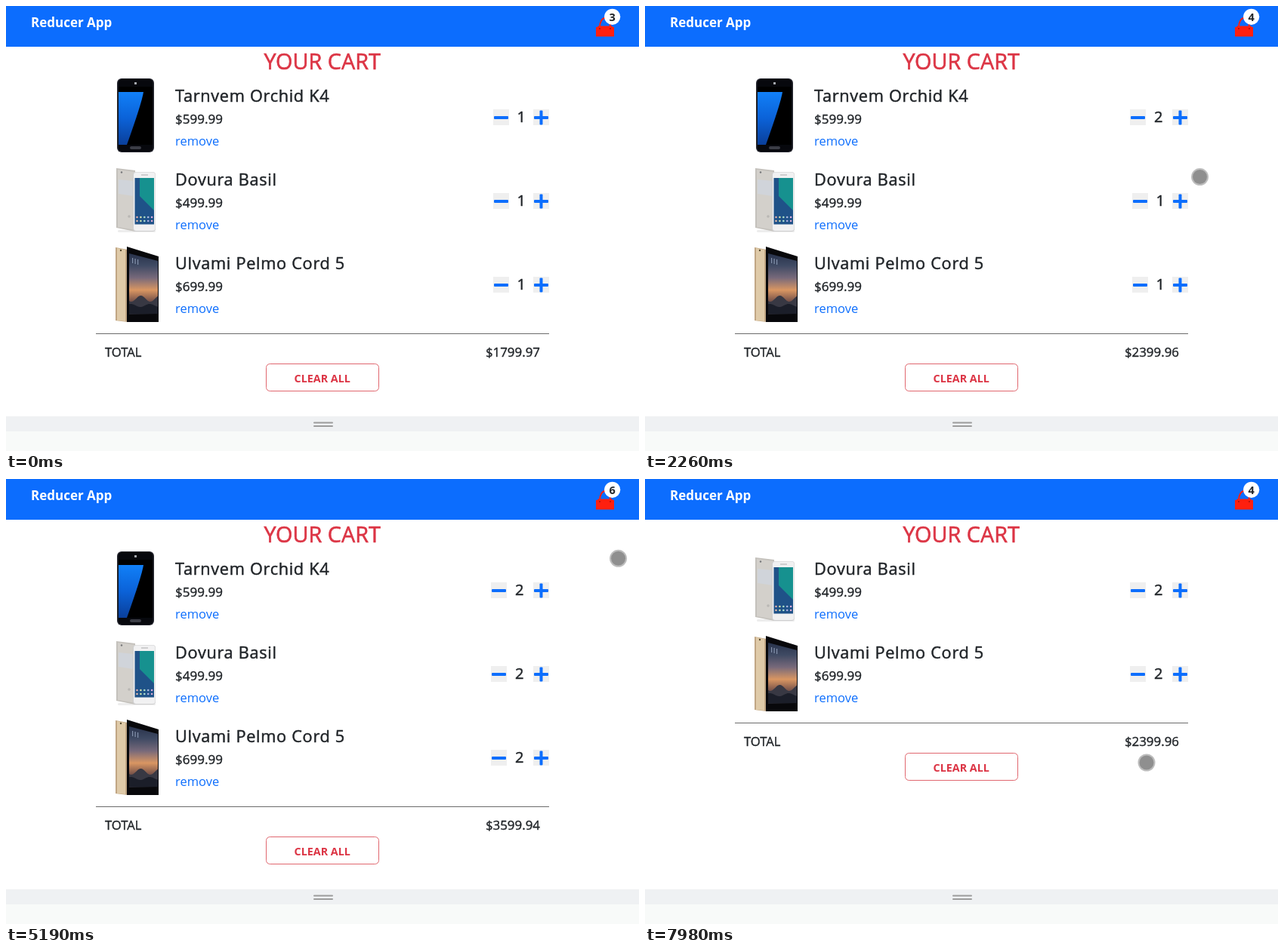
Write an HTML page with a canvas that moves like this. It is 838 px wide and 590 px high and loops after 8000 ms.

```html
<!DOCTYPE html>
<html lang="en">
<head>
<meta charset="utf-8">
<title>Cart</title>
<style>
  html, body { margin: 0; width: 100%; height: 100%; overflow: hidden; background: #fff; }
  canvas { display: block; width: 838px; height: 590px; }
</style>
</head>
<body>
<canvas id="stage"></canvas>
<script>
const W = 838, H = 590, LOOP = 8000, ROW = 111, STEP = 70;
const BLUE = '#0d6efd', RED = '#dc3545', INK = '#212529';
const canvas = document.getElementById('stage');
const ctx = canvas.getContext('2d');
const dpr = window.devicePixelRatio || 1;
canvas.width = W * dpr;
canvas.height = H * dpr;

const items = [
  { name: 'Tarnvem Orchid K4', price: 599.99, art: darkPhone },
  { name: 'Dovura Basil', price: 499.99, art: silverPhone },
  { name: 'Ulvami Pelmo Cord 5', price: 699.99, art: goldPhone }
];

// The cart changes shortly after a press, while the pointer is still lit
const ACT = 130, HOLD = 230;
const clicks = [
  { at: 1430, item: 0, add: 1 },
  { at: 2730, item: 1, add: 1 },
  { at: 4190, item: 2, add: 1 },
  { at: 6390, item: 0, add: -1 },
  { at: 7050, item: 0, add: -1 }
];

// Each move eases to (x, y); bend pushes the middle of its path to the right
const START = { x: 789, y: 566 };
const moves = [
  { from: 260, to: 1040, x: 709, y: 156 },
  { from: 1980, to: 2400, x: 725, y: 244, bend: 20 },
  { from: 2600, to: 2730, x: 710, y: 276 },
  { from: 3360, to: 4120, x: 713, y: 366 },
  { from: 4190, to: 4190, x: 713, y: 372 },
  { from: 4720, to: 5470, x: 826, y: 12, bend: 18 },
  { from: 5540, to: 5540, x: 788, y: 30 },
  { from: 5960, to: 6320, x: 656, y: 135 },
  { from: 6390, to: 6390, x: 647, y: 147 },
  { from: 7580, to: 7980, x: 664, y: 376, bend: 33 }
];

const mix = (a, b, u) => a + (b - a) * u;
const ease = u => u * u * (3 - 2 * u);

function pointerAt(t) {
  let { x, y } = START;
  for (const m of moves) {
    if (t < m.from) break;
    const gaps = Math.round((m.to - m.from) / STEP);
    const gap = (m.to - m.from) / gaps || STEP;
    const n = Math.floor((t - m.from + 8) / gap) + 1;
    const u = ease(Math.min(1, n / (gaps + 1)));
    x = mix(x, m.x, u) + (m.bend || 0) * 4 * u * (1 - u);
    y = mix(y, m.y, u);
  }
  return [x, y];
}

// A thin outline of width `heavy` gives a medium weight
function text(str, x, y, size, { color = INK, weight = 400, align = 'left', spacing = 0, heavy = 0 } = {}) {
  ctx.font = `${weight} ${size}px "Open Sans", "Noto Sans", sans-serif`;
  ctx.letterSpacing = spacing + 'px';
  ctx.textAlign = align;
  ctx.fillStyle = ctx.strokeStyle = color;
  ctx.fillText(str, x, y);
  if (!heavy) return;
  ctx.lineWidth = heavy;
  ctx.lineJoin = 'round';
  ctx.strokeText(str, x, y);
}

function box(x, y, w, h, color, r = 0) {
  ctx.fillStyle = color;
  ctx.beginPath();
  ctx.roundRect(x, y, w, h, r);
  ctx.fill();
}

function disc(x, y, r, color) {
  ctx.fillStyle = color;
  ctx.beginPath();
  ctx.arc(x, y, r, 0, Math.PI * 2);
  ctx.fill();
}

// Upright panel whose top and bottom edges drop by `top` and `bottom` to the right
function panel(x, y, w, h, color, top = 0, bottom = 0) {
  ctx.fillStyle = color;
  ctx.beginPath();
  ctx.moveTo(x, y);
  ctx.lineTo(x + w, y + top);
  ctx.lineTo(x + w, y + h + bottom);
  ctx.lineTo(x, y + h);
  ctx.fill();
}

function fade(y0, y1, ...colors) {
  const g = ctx.createLinearGradient(0, y0, 0, y1);
  colors.forEach((c, i) => g.addColorStop(i / (colors.length - 1), c));
  return g;
}

// Wavy ridge filled down to `base`
function ridge(x, w, y, base, height, phase, color) {
  ctx.fillStyle = color;
  ctx.beginPath();
  ctx.moveTo(x, base);
  for (let i = 0; i <= w; i++) ctx.lineTo(x + i, y - height * Math.sin(i / 4 + phase));
  ctx.lineTo(x + w, base);
  ctx.fill();
}

function darkPhone() {
  box(147, 96, 49, 98, '#25262f', 6);
  box(148.5, 97, 46, 96, '#07080d', 5);
  box(149, 107, 45, 77, '#000');
  ctx.fillStyle = fade(114, 184, '#1180f8', '#0b62d8', '#0a3f9a');
  ctx.beginPath();
  ctx.moveTo(149, 114);
  ctx.lineTo(182, 114);
  ctx.quadraticCurveTo(180, 128, 160, 184);
  ctx.lineTo(149, 184);
  ctx.fill();
  box(170, 101, 3, 3, '#a4a7ad');
  box(164, 186, 15, 4, '#3b3d46', 2);
}

function silverPhone() {
  box(148, 186, 50, 3, '#ededed', 1.5);
  panel(146, 104, 25, 79, '#c4c1bc', 3, 5);
  panel(148, 106, 23, 76, '#d3d0cb', 3, 4);
  panel(149, 119, 20, 19, '#d0d4da', 2, 3);
  disc(153, 109.5, 1.2, '#77777a');
  disc(163, 168, 1.8, '#b9b7b4');
  box(168, 109, 30, 79, '#cfcfd0', 4);
  box(169, 109.5, 28.5, 77.5, '#f1f1f2', 3.5);
  box(170.5, 117, 25.5, 61.5, '#1f5288');
  panel(177, 117, 19, 24, '#16918f', 0, 19);
  for (let i = 0; i < 10; i++) {
    disc(173.5 + i % 5 * 4.9, i < 5 ? 169 : 174, 1.3, `hsl(${i * 75}, 45%, 78%)`);
  }
  box(179, 112.5, 9, 1, '#aaa');
}

function goldPhone() {
  panel(145, 98, 16, 97, '#c1a684', 3, 2);
  panel(147, 99, 11, 96, '#dfcaa8', 2, 1);
  disc(152, 102, 1.2, '#57492f');
  panel(160, 97, 42, 100, '#08080b', 13, 0);
  panel(163, 106, 38, 81, fade(106, 187, '#28324b', '#3f4a63', '#77697a', '#d99662', '#6d4b47', '#20222c'), 10, -1);
  ridge(163, 38, 166, 186, 4, 4, '#383843');
  ridge(163, 38, 175, 186, 2, 1, '#1b1e29');
  for (let i = 0; i < 3; i++) box(167 + i * 3.5, 112 + i, 1.2, 7, '#8492ac');
}

function button(x, plus) {
  box(x, 137, 21, 21, '#efefef');
  box(x + 1, 146, 19, 4, BLUE, 1);
  if (plus) box(x + 8.5, 138.5, 4, 19, BLUE, 1);
}

function row(item, count) {
  item.art();
  text(item.name, 224, 127, 21.7, { spacing: 0.7, heavy: 0.5 });
  text('$' + item.price.toFixed(2), 224, 155.5, 17, { heavy: 0.4 });
  text('remove', 224, 185, 16.5, { color: BLUE });
  const shift = count > 1 ? 2.5 : 0;
  button(Math.floor(645 - shift), false);
  text(count, 682.3 - shift, 154, 20, { align: 'center', heavy: 0.5 });
  button(698, true);
}

function bag() {
  const red = '#ff1f0f';
  panel(781, 28, 24, 12.5, red);
  box(783, 26.5, 20, 3, red, 1);
  ctx.strokeStyle = red;
  ctx.lineWidth = 2;
  ctx.beginPath();
  ctx.ellipse(793, 28, 7, 12, 0, Math.PI, 0);
  ctx.stroke();
  disc(786, 30, 1, '#a81208');
  disc(800, 30, 1, '#a81208');
}

function header(count) {
  box(0, 0, W, 54, '#0c6dfe');
  text('Reducer App', 33, 28, 17, { color: '#fff', weight: 700 });
  bag();
  disc(802.7, 14.3, 10.6, '#fff');
  text(count, 802.7, 19.5, 14.5, { weight: 700, align: 'center' });
}

function footer(total) {
  box(119, 434, 600, 1, '#6b6b6b');
  text('TOTAL', 131, 465, 16.6, { heavy: 0.4 });
  text('$' + total.toFixed(2), 707, 465, 16.9, { align: 'right', heavy: 0.4 });
  ctx.strokeStyle = '#e0676f';
  ctx.lineWidth = 1;
  ctx.beginPath();
  ctx.roundRect(344.5, 474.5, 149, 36, 5);
  ctx.stroke();
  text('CLEAR ALL', 418.7, 499, 14.3, { color: RED, weight: 700, align: 'center' });
}

function pointer(t) {
  if (t < moves[0].from) return;
  const [x, y] = pointerAt(t);
  const pressed = clicks.some(c => t >= c.at && t < c.at + HOLD);
  disc(x, y, 11.5, pressed ? 'rgba(185,182,0,.42)' : 'rgba(0,0,0,.26)');
  disc(x, y, 9.5, pressed ? 'rgba(185,182,0,.57)' : 'rgba(0,0,0,.24)');
}

function draw(t) {
  const counts = items.map(() => 1);
  for (const c of clicks) if (t >= c.at + ACT) counts[c.item] += c.add;
  const total = items.reduce((sum, item, i) => sum + item.price * counts[i], 0);

  ctx.setTransform(dpr, 0, 0, dpr, 0, 0);
  box(0, 0, W, H, '#fff');
  header(counts.reduce((a, b) => a + b));
  text('YOUR CART', 418.7, 84, 28.8, { color: RED, align: 'center', heavy: 0.6 });

  ctx.save();
  items.forEach((item, i) => {
    if (!counts[i]) return;
    row(item, counts[i]);
    ctx.translate(0, ROW);
  });
  ctx.translate(0, -items.length * ROW);
  footer(total);
  ctx.restore();

  box(0, 544, W, 20, '#eff1f3');
  box(0, 564, W, 26, '#f8faf9');
  for (const y of [551.5, 556]) box(407, y, 26, 2, '#9c9c9c', 1);
  pointer(t);
}

const begin = performance.now();
function tick() {
  draw((performance.now() - begin) % LOOP);
  requestAnimationFrame(tick);
}
tick();
</script>
</body>
</html>
```
